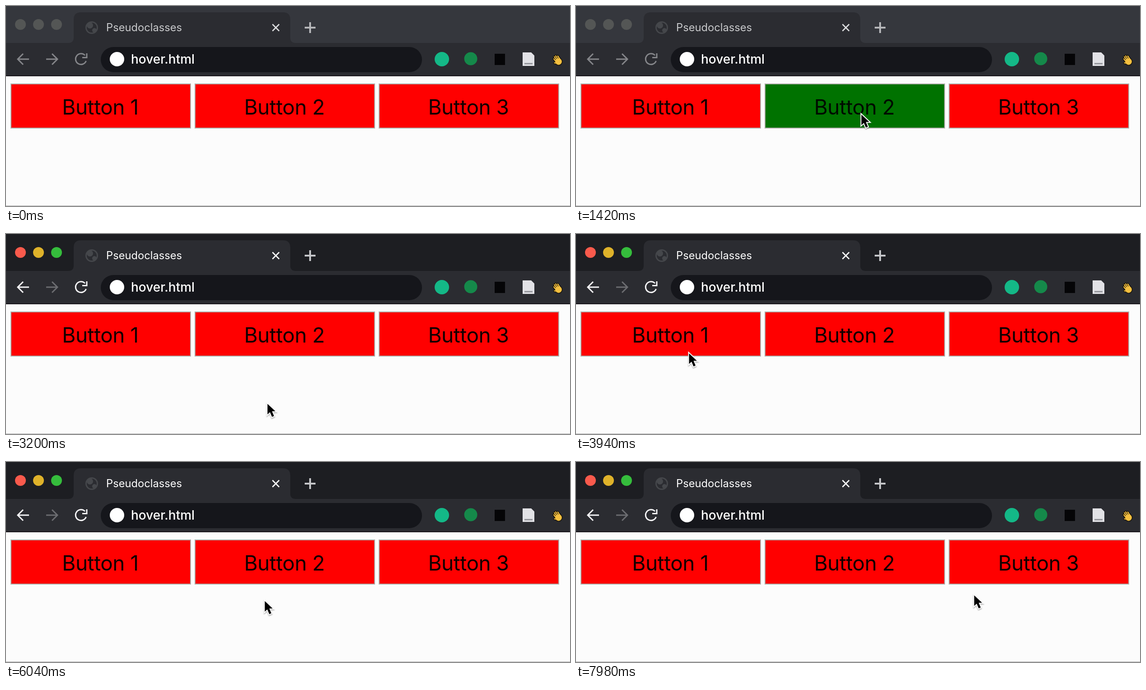
An HTML page that plays this animation: 1250x444 px, repeating every 8000 ms.

```html
<!DOCTYPE html>
<html lang="en">
<head>
<meta charset="utf-8">
<title>Hover</title>
<style>
  html, body { margin: 0; width: 100%; height: 100%; overflow: hidden; }
  svg { display: block; width: 1250px; height: 444px; background: #fcfcfc; font-family: Inter, Roboto, sans-serif; }
  .strip { fill: #35373d; }
  .bar { fill: #2b2c31; }
  .pill { fill: #15161b; }
  .light { fill: #545655; }
  .line { fill: none; stroke: #85868a; stroke-width: 3; }
  .title { fill: #c9cacc; font-size: 23.7px; }
  .close { stroke: #dcdddf; }
  .plus { stroke: #b4b5b8; stroke-width: 4; }
  .address { fill: #fff; font-size: 28px; font-weight: 500; }
  .active .strip { fill: #1d1e22; }
  .active .light { fill: var(--on); }
  .active .nav { stroke: #f4f4f6; }
  .active .title { fill: #fff; }
  .active .close { stroke: #fff; }
  .active .plus { stroke: #c4c5c8; }
  .active .forward { stroke: #6c6d71; }
  .button rect { fill: #f00; stroke: #b0aeaa; stroke-width: 2; }
  .button text { font-size: 46px; letter-spacing: -.5px; text-anchor: middle; fill: #120000; }
  .button.hover rect { fill: #007200; }
  .button.hover text { fill: #000c00; }
  #cursor { stroke: #fff; stroke-width: 4; paint-order: stroke; filter: drop-shadow(0 2px 1px rgba(0, 0, 0, .3)); }
</style>
</head>
<body>
<svg id="stage" viewBox="0 0 1250 444">
  <defs>
    <path id="arrow" d="M-13 0H11M0 -12L12 0L0 12"/>
    <path id="plus" d="M-12 0H12M0 -12V12"/>
    <path id="hand" d="M-5 0V-8M-1.5 0V-11M2 0V-11M5.5 0V-8M-5 4L-9 0M-3 3H3" stroke-linecap="round"/>
  </defs>

  <rect class="strip" width="1250" height="82"/>
  <rect class="bar" y="82" width="1250" height="74"/>
  <rect y="154" width="1250" height="2" fill="#1a171d"/>
  <g id="lights"></g>

  <!-- tab -->
  <path class="bar" d="M138 82Q150 82 150 70V30Q150 14 166 14H614Q630 14 630 30V70Q630 82 642 82Z"/>
  <g fill="#45474b">
    <circle cx="190" cy="48" r="12.5" fill="none" stroke="#45474b" stroke-width="3"/>
    <circle cx="186" cy="43" r="7"/>
    <circle cx="196" cy="54" r="5"/>
  </g>
  <text class="title" x="222" y="56">Pseudoclasses</text>
  <use class="line close" href="#plus" transform="translate(598 48) rotate(45) scale(.88)"/>
  <use class="line plus" href="#plus" x="674" y="48"/>

  <!-- toolbar -->
  <use class="line nav" href="#arrow" transform="translate(38 118) rotate(180)"/>
  <use class="line forward" href="#arrow" x="102" y="118"/>
  <path class="line nav" d="M175 109.5A12 12 0 1 0 177.5 122M179 105V114.5H169"/>
  <rect class="pill" x="210" y="91" width="712" height="56" rx="28"/>
  <circle cx="246" cy="118" r="16" fill="#fff"/>
  <text class="address" x="277" y="127.5">hover.html</text>

  <!-- extensions -->
  <circle cx="966" cy="118" r="16" fill="#14b887"/>
  <circle cx="1030" cy="117" r="14.5" fill="#15894a"/>
  <rect x="1083" y="106" width="23" height="25" fill="#050507"/>
  <path d="M1145 103H1164L1171 110V133H1145Z" fill="#e2e2e6"/>
  <path d="M1149 128H1167" stroke="#8f9096" stroke-width="3"/>
  <g transform="translate(1223 121) rotate(-35)">
    <g fill="#17130a" stroke="#17130a" stroke-width="5.5"><use href="#hand"/><circle cy="3" r="6"/></g>
    <g fill="#f5c040" stroke="#f5c040" stroke-width="2.4"><use href="#hand"/><circle cy="3" r="6"/></g>
  </g>

  <g id="buttons"></g>
  <rect y="443" width="1250" height="1" fill="#aaa"/>
  <path id="cursor" d="M1.5 4V27.5L7 22.5L11.5 33L16 31L11.5 20.5H19Z"/>
</svg>
<script>
  const LOOP = 8000, ENTER_AT = 60, FOCUS_AT = 2860, TRAVEL = 500;
  const PITCH = 408, WIDTH = 400;
  const byId = id => document.getElementById(id);
  const stage = byId('stage'), cursor = byId('cursor');

  // where the pointer comes to rest, and when it arrives
  const start = { x: 1040, y: 357 };
  const stops = [
    { at: 500, x: 1000, y: 220 },
    { at: 900, x: 780, y: 320 },
    { at: 1350, x: 631, y: 237 },
    { at: 2350, x: 578, y: 373 },
    { at: 3940, x: 249, y: 261 },
    { at: 4500, x: 160, y: 210 },
    { at: 5100, x: 207, y: 206 },
    { at: 5800, x: 568, y: 325 },
    { at: 6400, x: 589, y: 220 },
    { at: 7950, x: 881, y: 292 }
  ];

  byId('lights').innerHTML = ['#f95a4c', '#dfb22a', '#35bd3c'].map((color, i) =>
    `<circle class="light" style="--on:${color}" cx="${32 + 40 * i}" cy="41" r="12"/>`).join('');

  byId('buttons').innerHTML = [1, 2, 3].map((n, i) =>
    `<g class="button" transform="translate(${10 + PITCH * i} 172)">
      <rect x="1" y="1" width="${WIDTH - 2}" height="98"/>
      <text x="${WIDTH / 2 - 1}" y="68.5">Button ${n}</text>
    </g>`).join('');
  const buttons = [...byId('buttons').children];

  function ease(u) {
    const v = Math.min(Math.max(u, 0), 1);
    return v * v * (3 - 2 * v);
  }

  function pointerAt(t) {
    return stops.reduce((p, stop) => {
      const e = ease(1 + (t - stop.at) / TRAVEL);
      return { x: p.x + (stop.x - p.x) * e, y: p.y + (stop.y - p.y) * e };
    }, start);
  }

  function draw(now) {
    const t = now % LOOP;
    const { x, y } = pointerAt(t);
    const shown = t >= ENTER_AT;
    stage.classList.toggle('active', t >= FOCUS_AT);
    cursor.setAttribute('transform', `translate(${x} ${y})`);
    cursor.setAttribute('visibility', shown ? 'visible' : 'hidden');
    buttons.forEach((button, i) => {
      const dx = x - 10 - PITCH * i;
      button.classList.toggle('hover', shown && dx > 0 && dx < WIDTH && y > 172 && y < 258);
    });
    requestAnimationFrame(draw);
  }
  requestAnimationFrame(draw);
</script>
</body>
</html>
```
